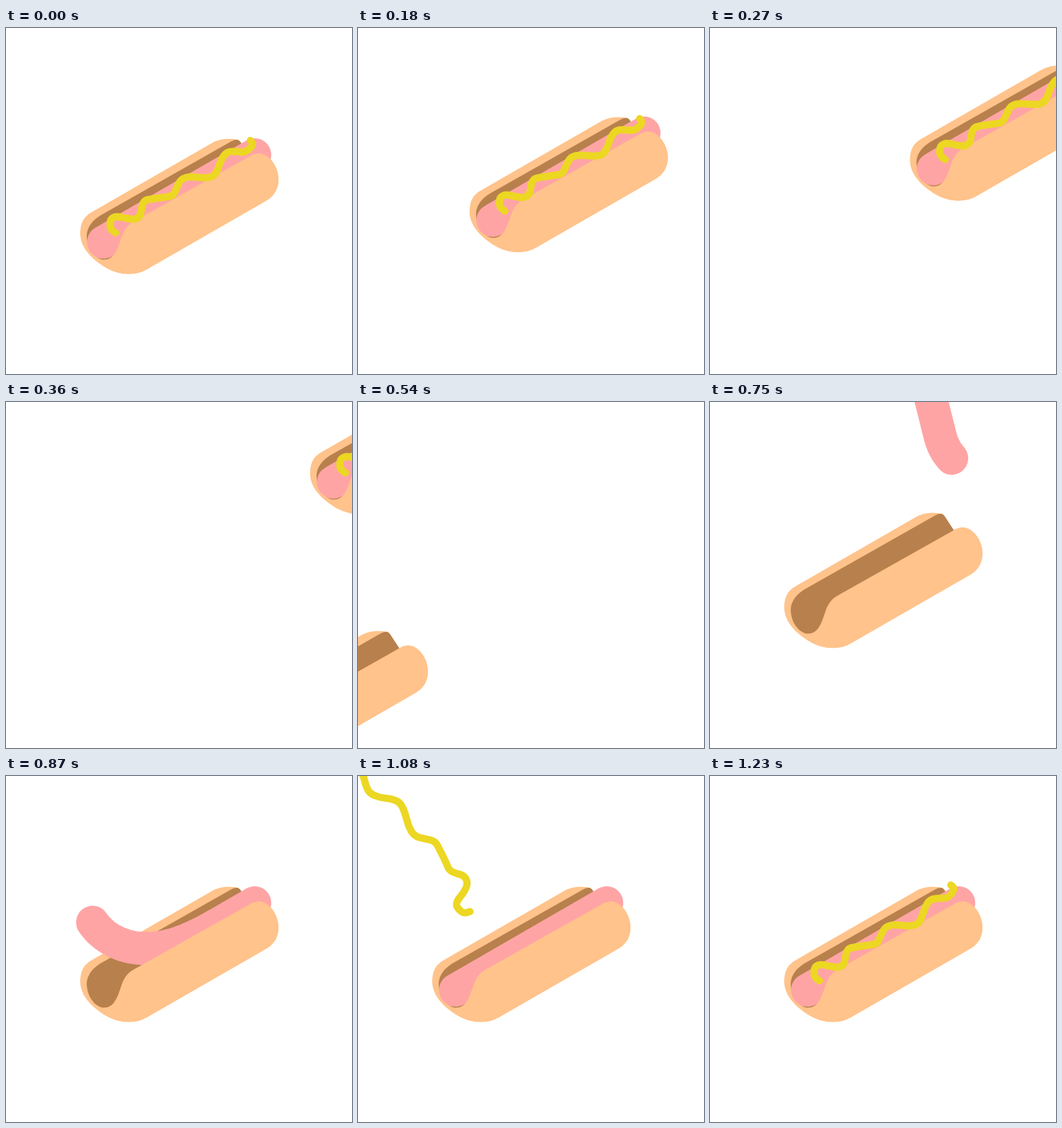
Write an HTML page with a canvas that moves like this. It is 480x480 px and loops after 1.26 s.

```html
<!DOCTYPE html>
<html>
<head>
<meta charset="utf-8">
<style>
  html, body { margin: 0; height: 100%; overflow: hidden; background: #fff; }
  canvas { display: block; }
</style>
</head>
<body>
<canvas id="stage" width="480" height="480"></canvas>
<script>
const ctx = document.getElementById('stage').getContext('2d');
const LOOP = 1260, STEP = 30;
const PEACH = '#ffc38b', BROWN = '#b8804c', PINK = '#ffa4a5', YELLOW = '#ecd722';
const RAD = Math.PI / 180;

const outerEdge = 'L338 178 C343 175 347 174 350 174 C365 174 378 192 378 210 C378 223 372 233 362 239 L195 335 C178 345 153 343 133 329';
const bunBack = new Path2D(`M118 256 L285 160 C297 153 310 153 322 155 ${outerEdge} C115 317 103 302 103 285 C103 270 108 262 118 256Z`);
const bunInside = new Path2D('M136 321.5 C124 321 112 306 112 288 C112 276 121 266 131 260 L313 157 C319 154 323 154 326 159 L339 179 L178 275 L150 318 C146 321 141 322 136 321.5Z');
const bunFront = new Path2D(`M136 321.5 C150 321 154 308 159 294 C163 281 167 274 178 268 ${outerEdge}Z`);

const squiggle = [
  [152, 284], [145, 280], [144, 271], [146, 264], [154, 261], [166, 264], [179, 266], [187, 260],
  [188, 248], [192, 239], [203, 237], [218, 235], [232, 233], [237, 221], [243, 209],
  [256, 206], [272, 208], [287, 207], [294, 197], [298, 183], [306, 172], [318, 171],
  [331, 173], [341, 165], [342, 160], [339, 156]
];

// A flexible strip drops in, lands with its tip at (x, y) and unrolls along its heading.
const sausage = { x: 345, y: 176, heading: 150, turn: 1, land: 808, fall: 1.69, drift: -0.1, unroll: 845 };
const mustard = { x: 146, y: 277, heading: -30, turn: -1, land: 1117, fall: 2.4, drift: 0, unroll: 1154 };
const UNROLL_SPEED = 1.95, MAX_BEND = 106;

const clamp = (v, lo, hi) => Math.min(hi, Math.max(lo, v));

function place(strip, t, along, across) {
  const laid = (t - strip.unroll) * UNROLL_SPEED;
  const height = Math.max(0, strip.land - t) * strip.fall;
  let x = strip.x + height * strip.drift, y = strip.y - height;
  const n = 60, d = along / n;
  const bend = s => Math.min(MAX_BEND, 0.0023 * Math.max(0, s - laid) ** 2);
  const angle = s => (strip.heading + strip.turn * bend(s)) * RAD;
  for (let i = 0; i < n; i++) {
    const s = (i + 0.5) * d;
    const stretched = d * (1 + 0.18 * bend(s) / MAX_BEND);
    x += stretched * Math.cos(angle(s));
    y += stretched * Math.sin(angle(s));
  }
  const end = angle(along);
  return [x - across * Math.sin(end), y + across * Math.cos(end)];
}

function stroke(points, width, color) {
  ctx.beginPath();
  ctx.moveTo(...points[0]);
  for (let i = 1; i < points.length - 1; i++) {
    const [x, y] = points[i], [nx, ny] = points[i + 1];
    ctx.quadraticCurveTo(x, y, (x + nx) / 2, (y + ny) / 2);
  }
  ctx.lineTo(...points[points.length - 1]);
  ctx.lineWidth = width;
  ctx.lineCap = ctx.lineJoin = 'round';
  ctx.strokeStyle = color;
  ctx.stroke();
}

function fill(path, color) {
  ctx.fillStyle = color;
  ctx.fill(path);
}

const sausageLine = Array.from({ length: 45 }, (_, i) => [i * 5.5, 0]);
const cosM = Math.cos(mustard.heading * RAD), sinM = Math.sin(mustard.heading * RAD);
const mustardLine = squiggle.map(([px, py]) => {
  const dx = px - mustard.x, dy = py - mustard.y;
  return [dx * cosM + dy * sinM, dy * cosM - dx * sinM];
});

const ease = s => s * s * (2 - s);

function shifted(offset, paint) {
  ctx.save();
  ctx.translate(offset, -offset * 0.583);
  paint();
  ctx.restore();
}

function draw(t) {
  const leaving = t < 450;
  const shift = leaving
    ? 403 * ease(clamp((t - 90) / 330, 0, 1))
    : -380 * ease(clamp((750 - t) / 270, 0, 1));
  // Toppings only travel with the bun on its way out.
  const carried = leaving ? shift : 0;
  const time = leaving ? t + LOOP * 2 : t;
  const lay = (strip, line) => line.map(([s, n]) => place(strip, time, s, n));

  ctx.fillStyle = '#fff';
  ctx.fillRect(0, 0, 480, 480);
  shifted(shift, () => {
    fill(bunBack, PEACH);
    fill(bunInside, BROWN);
  });
  shifted(carried, () => stroke(lay(sausage, sausageLine), 46, PINK));
  shifted(shift, () => fill(bunFront, PEACH));
  shifted(carried, () => stroke(lay(mustard, mustardLine), 10, YELLOW));
}

const start = performance.now();
function tick() {
  const t = (performance.now() - start) % LOOP;
  draw(Math.floor(t / STEP) * STEP);
  requestAnimationFrame(tick);
}
tick();
</script>
</body>
</html>
```
